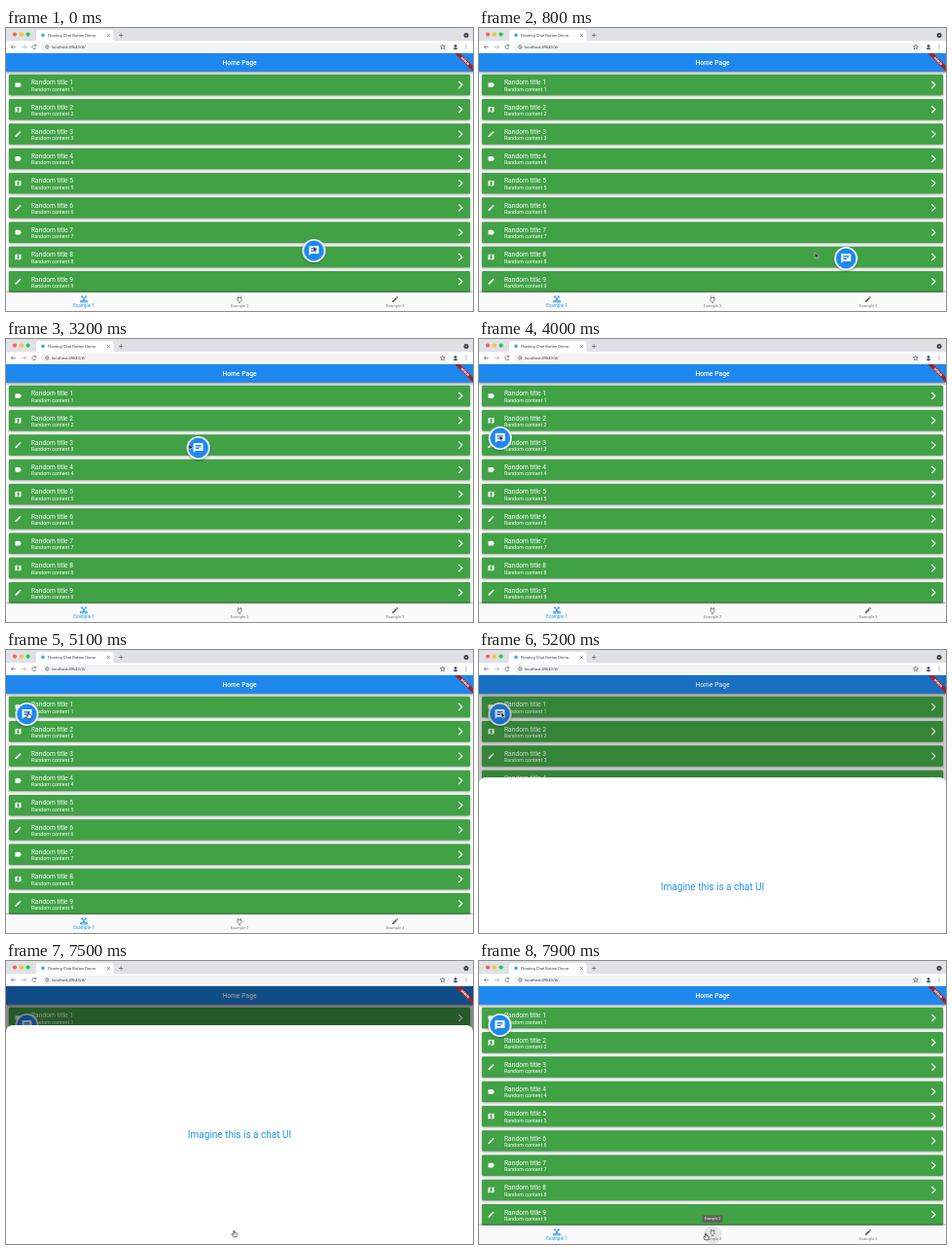
Write an HTML page that moves like this. It is 480 px wide and 291 px high and loops after 8000 ms.

```html
<!DOCTYPE html>
<html lang="en">
<head>
<meta charset="utf-8">
<title>Floating Chat Button Demo</title>
<style>
html, body { margin: 0; width: 100%; height: 100%; overflow: hidden; background: #fafafa; }
svg { display: block; width: 480px; height: 291px; font-family: Roboto, sans-serif; }
.mid { text-anchor: middle; }
.med { font-weight: 500; }
.line { fill: none; stroke: #5f6368; stroke-width: .7; }
.anim { animation: 8s linear infinite; }
#button { animation-name: button; }
#cursor { animation-name: cursor; }
#arrow { animation-name: arrow; animation-timing-function: step-end; }
#hand { animation-name: hand; animation-timing-function: step-end; }
#barrier { animation-name: dim; }
#sheet { animation-name: sheet; }
.hover { animation-name: hover; animation-timing-function: step-end; }

@keyframes button {
  0%, 1.25% { transform: translate(316.5px, 229px); }
  8.75% { transform: translate(347px, 237px); animation-timing-function: ease-in-out; }
  12.25%, 18.1% { transform: translate(458.5px, 237px); }
  23.1%, 23.75% { transform: translate(333px, 251px); animation-timing-function: ease-in-out; }
  27.25%, 30.6% { transform: translate(458.5px, 251px); }
  33.75% { transform: translate(375px, 238px); }
  40% { transform: translate(198px, 112px); }
  41.75% { transform: translate(140px, 102px); animation-timing-function: ease-in-out; }
  45%, 50% { transform: translate(21.5px, 102px); }
  52.5%, 53% { transform: translate(70px, 66px); animation-timing-function: ease-in-out; }
  56.25%, 100% { transform: translate(21.5px, 66px); }
}
@keyframes cursor {
  0%, 1.25% { transform: translate(316px, 224.5px); }
  8.75%, 12.25% { transform: translate(345.5px, 231px); }
  17.5%, 18.1% { transform: translate(457px, 232px); }
  23.1%, 24.5% { transform: translate(331.5px, 246px); }
  28.75%, 30.6% { transform: translate(465px, 251px); }
  33.75% { transform: translate(370px, 236px); }
  40% { transform: translate(188.5px, 108px); }
  41.75%, 44% { transform: translate(139px, 100px); }
  49%, 50% { transform: translate(21px, 99px); }
  52.5%, 54% { transform: translate(69px, 63px); }
  60%, 73.75% { transform: translate(23px, 64px); }
  76%, 78.75% { transform: translate(27.8px, 63.5px); animation-timing-function: ease-in-out; }
  82.5% { transform: translate(195px, 279px); }
  83.75%, 86.25% { transform: translate(193.5px, 276px); }
  88.75%, 93% { transform: translate(235px, 276px); }
  96%, 100% { transform: translate(233px, 280px); }
}
@keyframes arrow {
  0%, 30.6%, 65% { opacity: 1; }
  28.5%, 61%, 88%, 100% { opacity: 0; }
}
@keyframes hand {
  0%, 30.6%, 65% { opacity: 0; }
  28.5%, 61%, 88%, 100% { opacity: 1; }
}
@keyframes dim {
  0%, 63.9% { opacity: 0; }
  67.5%, 93.1% { opacity: .56; }
  96%, 100% { opacity: 0; }
}
@keyframes sheet {
  0%, 63.9% { transform: translateY(250px); animation-timing-function: cubic-bezier(0, 0, .2, 1); }
  67.5%, 93.1% { transform: none; animation-timing-function: cubic-bezier(.4, 0, 1, 1); }
  96%, 100% { transform: translateY(250px); }
}
@keyframes hover {
  0% { opacity: 0; }
  96.2%, 100% { opacity: 1; }
}
</style>
</head>
<body>
<svg viewBox="0 0 480 291">
  <defs>
    <path id="label" d="M17.63 5.84C17.27 5.33 16.67 5 16 5H5C3.9 5 3 5.9 3 7v10c0 1.1.9 2 2 2h11c.67 0 1.27-.33 1.63-.84L22 12z"/>
    <path id="map" d="M20.5 3l-.16.03L15 5.1 9 3 3.36 4.9c-.21.07-.36.25-.36.48V20.5c0 .28.22.5.5.5l.16-.03L9 18.9l6 2.1 5.64-1.9c.21-.07.36-.25.36-.48V3.5c0-.28-.22-.5-.5-.5zM15 19l-6-2.11V5l6 2.11z"/>
    <path id="edit" d="M3 17.25V21h3.75L17.81 9.94l-3.75-3.75zM20.71 7.04c.39-.39.39-1.02 0-1.41l-2.34-2.34c-.39-.39-1.02-.39-1.41 0l-1.83 1.83 3.75 3.75z"/>
    <filter id="soft" x="-30%" y="-30%" width="160%" height="160%"><feGaussianBlur stdDeviation=".9"/></filter>
    <clipPath id="page"><path d="M0 26H480V291H0z"/></clipPath>
  </defs>

  <rect width="480" height="291" fill="#fafafa"/>
  <g id="list"></g>

  <!-- bottom navigation -->
  <rect y="271" width="480" height="3" fill="#000" opacity=".35" filter="url(#soft)"/>
  <rect y="272" width="480" height="19" fill="#fafafa"/>
  <circle class="anim hover" cx="240" cy="281.5" r="9.5" fill="#000" fill-opacity=".08"/>
  <g fill="none" stroke="#2196f3" stroke-width=".9">
    <path d="M76.8 276.4q3.2 0 4.2 4M83.2 276.4q-3.2 0-4.2 4M76.6 281.9v-1.6h6.8v1.6z"/>
    <path d="M78.2 275.9h.1M81.7 275.9h.1" stroke-width="1.5" stroke-linecap="round"/>
  </g>
  <path d="M238.7 275.6v2M241.3 275.6v2M238 277.6h4v2.6l-1.2 1.2v1h-1.6v-1l-1.2-1.2z" fill="none" stroke="#616161" stroke-width=".7"/>
  <use href="#edit" transform="translate(396 275) scale(.333)" fill="#616161"/>
  <g class="mid" fill="#757575" font-size="4">
    <text x="80" y="287.3" font-size="4.67" fill="#2196f3">Example 1</text>
    <text x="240" y="287.2">Example 2</text>
    <text x="400" y="287.2">Example 3</text>
  </g>
  <g class="anim hover">
    <rect x="229.5" y="261.3" width="21" height="7.7" rx="1.2" fill="#616161" fill-opacity=".95"/>
    <text class="mid" x="240" y="266.4" font-size="3.5" fill="#fff">Example 2</text>
  </g>

  <!-- app bar -->
  <rect y="42" width="480" height="4" fill="#000" opacity=".4" filter="url(#soft)"/>
  <rect y="25.5" width="480" height="19.3" fill="#1e88ee"/>
  <text class="mid med" x="240" y="37.8" font-size="6.67" letter-spacing=".05" fill="#fff">Home Page</text>

  <g id="button" class="anim">
    <circle r="12" cy=".8" fill="#000" opacity=".45" filter="url(#soft)"/>
    <circle r="12" fill="#fff"/>
    <circle r="10.4" fill="#1e88ee"/>
    <path transform="translate(-6 -6) scale(.5)" fill="#fff" d="M20 2H4c-1.1 0-2 .9-2 2v18l4-4h14c1.1 0 2-.9 2-2V4c0-1.1-.9-2-2-2zM6 9h12v2H6zm8 5H6v-2h8zm4-6H6V6h12z"/>
  </g>

  <!-- chat sheet -->
  <rect id="barrier" class="anim" y="25.5" width="480" height="265.5"/>
  <g clip-path="url(#page)">
    <g id="sheet" class="anim" fill="#2196f3">
      <path d="M0 300V51.5a6.5 6.5 0 0 1 6.5-6.5H473.5a6.5 6.5 0 0 1 6.5 6.5V300z" fill="#fefefe"/>
      <text class="mid" x="240" y="160.5" font-size="10">Imagine this is a chat UI</text>
      <text class="mid med" x="240" y="282.2" font-size="6.67" letter-spacing=".05">Dismiss</text>
    </g>
    <g transform="translate(480 26) rotate(45)">
      <rect x="-13.4" y="9.3" width="26.8" height="4" fill="#a32226"/>
      <text class="mid" y="12.5" font-size="3.4" font-weight="900" fill="#fff">DEBUG</text>
    </g>
  </g>

  <!-- browser frame -->
  <rect width="480" height="14" fill="#dee1e6"/>
  <rect y="13.3" width="480" height="12.3" fill="#fff"/>
  <path d="M28.5 13.5q2.5 0 2.5-2.5V4.5q0-2.5 2.5-2.5H108q2.5 0 2.5 2.5V11q0 2.5 2.5 2.5z" fill="#fff"/>
  <circle cx="9" cy="6.6" r="2.1" fill="#fe5f57"/>
  <circle cx="15.8" cy="6.6" r="2.1" fill="#febc2e"/>
  <circle cx="22.6" cy="6.6" r="2.1" fill="#28c840"/>
  <circle cx="38" cy="7.4" r="1.8" fill="#42a5f5"/>
  <text x="43" y="9" font-size="4.1" fill="#3c4043">Floating Chat Button Demo</text>
  <path class="line" d="M104.2 6.2l2.6 2.6M106.8 6.2l-2.6 2.6M116 7.5h4.4M118.2 5.3v4.4"/>
  <circle cx="473" cy="7.4" r="2.5" fill="#3c4043"/>
  <path d="M471.8 6.9l1.2 1.2 1.2-1.2" fill="none" stroke="#fff" stroke-width=".6"/>
  <rect x="36" y="15" width="420" height="9" rx="4.5" fill="#f1f3f4"/>
  <path class="line" d="M9.8 19.4H5.4M7.4 17.3l-2.1 2.1 2.1 2.1"/>
  <path class="line" d="M16 19.4h4.4M18.4 17.3l2.1 2.1-2.1 2.1" opacity=".55"/>
  <path class="line" d="M30.5 18a2.1 2.1 0 1 0 .5 2M30.9 16.8v1.7h-1.7"/>
  <circle class="line" cx="42.3" cy="19.4" r="1.7"/>
  <path class="line" d="M42.3 19.1v1.2M42.3 18.2v.4" stroke-width=".5"/>
  <text x="47" y="20.9" font-size="4.05" fill="#3c4043">localhost:49643/#/</text>
  <path class="line" stroke-width=".6" d="M448.8 17l.7 1.6 1.8.2-1.4 1.1.5 1.8-1.6-1-1.6 1 .5-1.8-1.4-1.1 1.8-.2z"/>
  <circle cx="462" cy="19.4" r="3" fill="#dfe3ea"/>
  <path d="M459.8 21.4q2.2-2.2 4.4 0-2.2 1.6-4.4 0z" fill="#3c4664"/>
  <circle cx="462" cy="18.5" r="1.2" fill="#3c4664"/>
  <path d="M473 17.6h.01M473 19.4h.01M473 21.2h.01" stroke="#5f6368" stroke-linecap="round"/>

  <g id="cursor" class="anim" stroke-linejoin="round">
    <path id="arrow" class="anim" d="M0 0V5.6L1.3 4.4 2.2 6.5 3.2 6.1 2.3 4.1H4.1z" fill="#111" stroke="#fff" stroke-width=".5"/>
    <path id="hand" class="anim" d="M-.6 .4Q0-.4 .5 .4V2.4Q1.2 2 1.5 2.6 2.2 2.3 2.5 3 3.3 2.8 3.3 3.7 3.4 5.3 2.5 6.7H-.7Q-1.5 5.2-2.5 4.1-2.2 3.1-1.3 3.7L-.6 4.3z" fill="#fff" stroke="#111" stroke-width=".65"/>
  </g>
</svg>
<script>
const icons = ['label', 'map', 'edit'];
const row = i => {
  const y = 47.8 + i * 25.28;
  return `<g transform="translate(0 ${y})" fill="#fff">
    <rect x="3" y=".6" width="474" height="21.4" rx="1.3" fill="#000" opacity=".4" filter="url(#soft)"/>
    <rect x="3" width="474" height="21.4" rx="1.3" fill="#41a245"/>
    <use href="#${icons[i % 3]}" transform="translate(8.5 6.7) scale(.333)"/>
    <text x="26" y="10.5" font-size="6.67">Random title ${i + 1}</text>
    <text x="26" y="16.8" font-size="5.33">Random content ${i + 1}</text>
    <path d="M465.3 7.2l3.5 3.5-3.5 3.5" fill="none" stroke="#fff" stroke-width="1.2"/>
  </g>`;
};
document.getElementById('list').innerHTML = Array.from({ length: 9 }, (_, i) => row(i)).join('');
</script>
</body>
</html>
```
